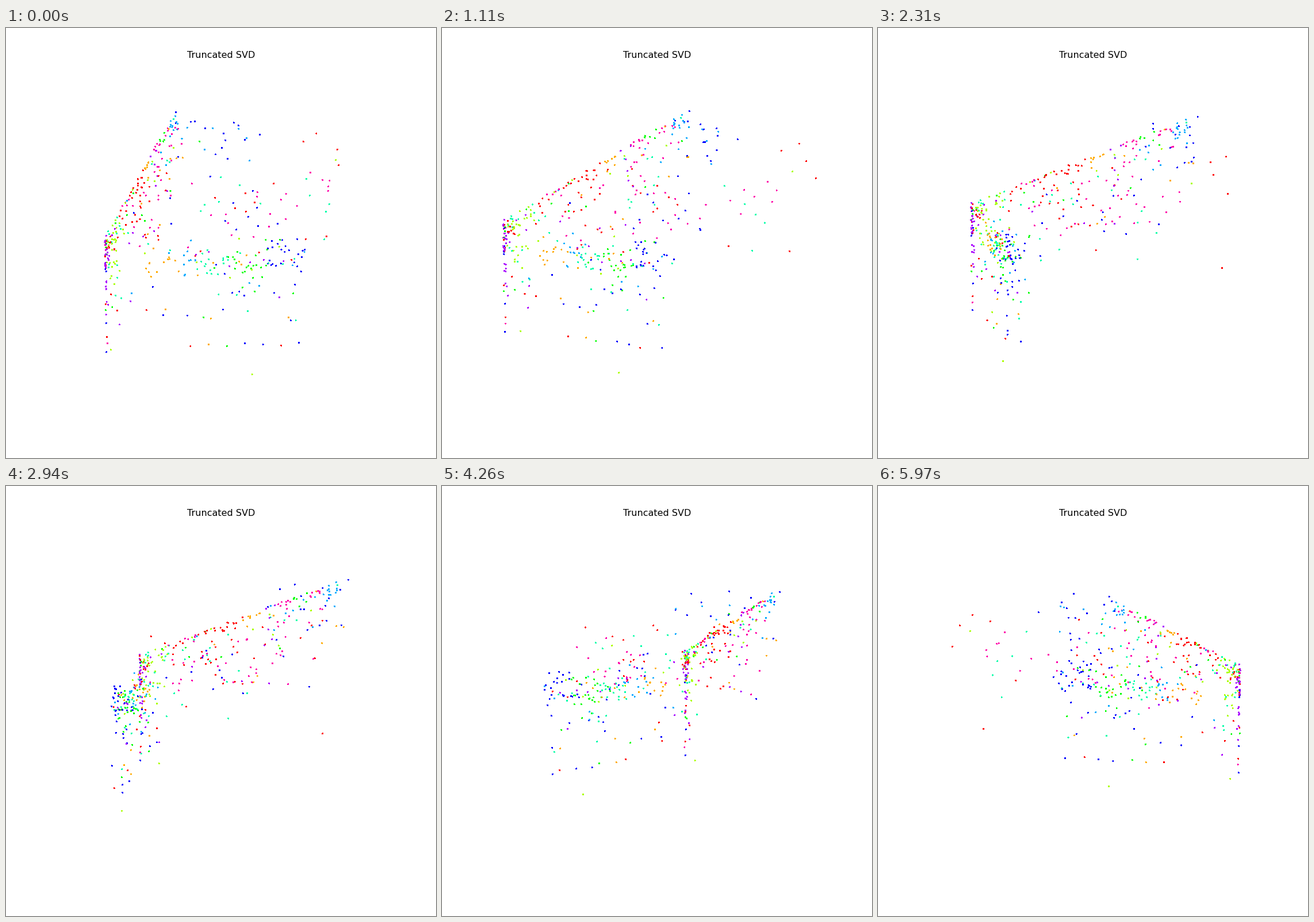
Write a matplotlib script that moves like this. It is 748 px wide and 748 px high and loops after 6000 ms.

```python
import colorsys

import matplotlib.pyplot as plt
import numpy as np
from matplotlib.animation import FuncAnimation

SIZE, FRAMES, INTERVAL = 748, 200, 30
ELEV = np.radians(10)
DIST = 10
SCALE = SIZE / 0.185
CENTER = SIZE * 0.095 / 0.185

RED, ORANGE, LIME, GREEN, MINT, SKY, BLUE, VIOLET, PINK = range(9)
PALETTE = np.array([colorsys.hsv_to_rgb(k / 9, 1, 1) for k in range(9)])

# Main hues along the two arms that leave the corner
RIDGE_HUES = [MINT, LIME, RED, PINK, RED, RED, RED, ORANGE, VIOLET, PINK, GREEN,
              PINK, SKY, BLUE]
ARM_HUES = [ORANGE, ORANGE, SKY, MINT, MINT, GREEN, GREEN, BLUE, BLUE]

# Points that mark the outline: hue, offsets p and q, height z
OUTLINE = [
    (RED, .92, .90, .39), (RED, .84, .99, .33), (RED, .90, 1.0, .25),
    (RED, .87, .84, .36), (RED, .92, .855, -.088), (LIME, .75, .98, .295),
    (MINT, .536, .923, -.022), (LIME, .027, .605, -.50), (LIME, .09, .016, -.41),
    (BLUE, .002, .003, -.40),
]

rng = np.random.default_rng(7)
points, hues = [], []


def add(hue, p, q, z):
    """Store points at offsets p, q from the corner and height z."""
    p, q, z, hue = np.broadcast_arrays(p, q, z, hue)
    points.append(np.column_stack([.47 - p, q - .5, z]))
    hues.append(hue)


def blend(main, t, noise):
    """Hue found at position t of a run, with a share of random hues."""
    k = np.clip(t * len(main), 0, len(main) - 1).astype(int)
    stray = rng.random(t.size) < noise
    return np.where(stray, rng.integers(0, 9, t.size), np.array(main)[k])


def build():
    for spot in OUTLINE:
        add(*(np.atleast_1d(v) for v in spot))

    # corner column, thinning out downwards
    n = 46
    z = np.append(rng.triangular(-.15, .06, .095, n - 8), rng.uniform(-.4, -.16, 8))
    add(rng.choice([RED, PINK, VIOLET, VIOLET, BLUE, GREEN], n),
        rng.exponential(.005, n), rng.exponential(.004, n), z)

    # loose points around the column
    n = 52
    p = .02 + rng.exponential(.05, n)
    add(rng.choice([LIME, LIME, LIME, MINT, RED, VIOLET], n),
        p, .25 * p + rng.exponential(.02, n), .08 + .2 * p - rng.exponential(.08, n))

    # ridge, and the fan hanging below it
    p = np.linspace(.02, .96, 66) + rng.normal(0, .012, 66)
    add(blend(RIDGE_HUES, p, .12), p, .28 * p + rng.exponential(.01, p.size),
        .085 + .42 * p - rng.exponential(.015, p.size))
    n = 88
    p = .15 + .82 * rng.random(n) ** .75
    drop = np.minimum(rng.exponential(.12, n), .09 + .4 * p)
    add(blend(RIDGE_HUES, p, .25), p, .28 * p + rng.exponential(.03, n),
        .085 + .41 * p - drop)

    # second arm, flat and close to the wall
    t = rng.beta(1.3, 1.1, 118)
    add(blend(ARM_HUES, t, .35), .02 + rng.exponential(.03, t.size), .15 + .68 * t,
        rng.normal(-.03, .045, t.size))

    # open space between the arms
    n = 36
    add(rng.choice([PINK, PINK, RED, BLUE, MINT], n), rng.normal(.38, .13, n),
        rng.normal(.6, .12, n), rng.normal(.13, .07, n))
    n = 18
    add(rng.choice([BLUE, BLUE, SKY], n), rng.uniform(.65, .94, n),
        rng.uniform(.3, .7, n), rng.uniform(.2, .47, n))
    n = 9
    add(rng.choice([PINK, MINT], n), rng.uniform(.42, .73, n),
        rng.uniform(.82, .95, n), rng.uniform(.05, .28, n))

    # sparse points underneath, ending in an even row
    n = 26
    add(rng.choice([ORANGE, BLUE, VIOLET, RED, GREEN, MINT, SKY], n),
        rng.uniform(.01, .12, n), rng.uniform(.02, .8, n), rng.uniform(-.28, -.12, n))
    row = [RED, ORANGE, GREEN, BLUE, BLUE, RED, BLUE]
    add(row, rng.uniform(0, .07, 7), np.linspace(.35, .8, 7), -.375)
    return np.vstack(points), PALETTE[np.concatenate(hues)]


def project(xyz, azim):
    """Screen positions in pixels and closeness to the camera."""
    x, y, z = xyz.T
    c, s = np.cos(azim), np.sin(azim)
    right, toward = y * c - x * s, x * c + y * s
    up = z * np.cos(ELEV) - toward * np.sin(ELEV)
    near = toward * np.cos(ELEV) + z * np.sin(ELEV)
    zoom = SCALE / (DIST - near)
    return np.column_stack([CENTER + right * zoom, CENTER + up * zoom]), near


cloud, colors = build()
fig = plt.figure(figsize=(SIZE / 100, SIZE / 100), dpi=100, facecolor="white")
ax = fig.add_axes([0, 0, 1, 1])
ax.set(xlim=(0, SIZE), ylim=(0, SIZE))
ax.axis("off")
fig.text(0.5, 1 - 52.5 / SIZE, "Truncated SVD", fontsize=11.52,
         family="DejaVu Sans", ha="center", va="baseline")
dots = ax.scatter(cloud[:, 0], cloud[:, 1], s=2.2, c=colors, linewidths=0,
                  antialiased=False)


def update(i):
    pos, near = project(cloud, np.radians(i))
    order = np.argsort(near)
    dots.set_offsets(pos[order])
    dots.set_facecolors(colors[order])
    return (dots,)


anim = FuncAnimation(fig, update, frames=FRAMES, interval=INTERVAL,
                     repeat=True, repeat_delay=0)
plt.show()
```
